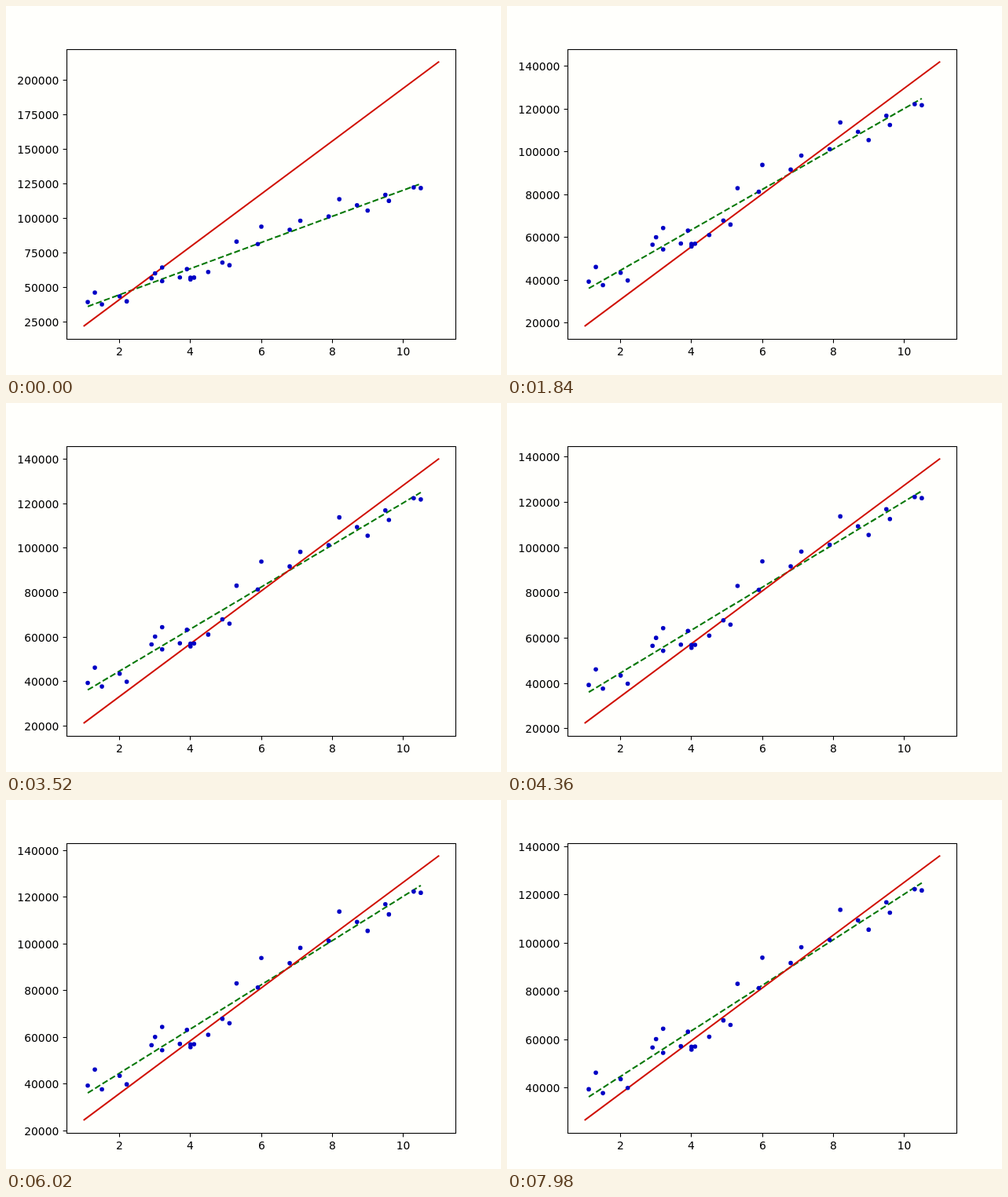
Recreate the animation shown at these times as an HTML page with a canvas. Size 630x470 px, loop 8 s.

```html
<!DOCTYPE html>
<html lang="en">
<head>
<meta charset="utf-8">
<title>Gradient descent line fit</title>
<style>
html, body { margin: 0; width: 630px; height: 470px; overflow: hidden; background: #fffffc; }
canvas { display: block; }
</style>
</head>
<body>
<canvas id="plot" width="630" height="470"></canvas>
<script>
const ctx = document.getElementById('plot').getContext('2d');
const LOOP = 8000, STEP = 80, PHASE = 60, RATE = 0.04;
const LEFT = 77, RIGHT = 573, TOP = 54.6, BOTTOM = 424.2;

const xs = [1.1, 1.3, 1.5, 2, 2.2, 2.9, 3, 3.2, 3.2, 3.7, 3.9, 4, 4, 4.1, 4.5,
  4.9, 5.1, 5.3, 5.9, 6, 6.8, 7.1, 7.9, 8.2, 8.7, 9, 9.5, 9.6, 10.3, 10.5];
const ys = [39343, 46205, 37731, 43525, 39891, 56642, 60150, 54445, 64445, 57189,
  63218, 55794, 56957, 57081, 61111, 67938, 66029, 83088, 81363, 93940,
  91738, 98273, 101302, 113812, 109431, 105582, 116969, 112635, 122391, 121872];

const mean = f => xs.reduce((sum, x, i) => sum + f(x, ys[i]), 0) / xs.length;
const mx = mean(x => x), my = mean((x, y) => y);
const mxx = mean(x => x * x), mxy = mean((x, y) => x * y);
const bestSlope = (mxy - mx * my) / (mxx - mx * mx);
const best = x => my + bestSlope * (x - mx);

// Line after n steps of gradient descent from zero
function fitted(n) {
  let a = 0, b = 0;
  while (n--) {
    const da = a + b * mx - my, db = a * mx + b * mxx - mxy;
    a -= RATE * da;
    b -= RATE * db;
  }
  return x => a + b * x;
}

const px = x => LEFT + (x - 0.5) / 11 * (RIGHT - LEFT);
const snap = v => Math.floor(v) + 0.5;

function stroke(x1, y1, x2, y2, color, width, cap = 'butt', dash = []) {
  ctx.strokeStyle = color;
  ctx.lineWidth = width;
  ctx.lineCap = cap;
  ctx.setLineDash(dash);
  ctx.beginPath();
  ctx.moveTo(x1, y1);
  ctx.lineTo(x2, y2);
  ctx.stroke();
}

function draw(n) {
  const line = fitted(n);
  const values = [...ys, best(1.1), best(10.5), line(1), line(11)];
  const min = Math.min(...values), max = Math.max(...values);
  const pad = (max - min) * 0.05, low = min - pad, high = max + pad;
  const py = y => BOTTOM - (y - low) / (high - low) * (BOTTOM - TOP);

  ctx.fillStyle = '#fffffc';
  ctx.fillRect(0, 0, 630, 470);

  stroke(px(1.1), py(best(1.1)), px(10.5), py(best(10.5)), '#087808', 2.08, 'butt', [7.71, 3.33]);
  stroke(px(1), py(line(1)), px(11), py(line(11)), '#d01000', 2.08, 'square');
  ctx.fillStyle = '#0000c4';
  xs.forEach((x, i) => {
    ctx.beginPath();
    ctx.arc(px(x), py(ys[i]), 2.8, 0, Math.PI * 2);
    ctx.fill();
  });

  ctx.fillStyle = '#000';
  ctx.font = '13.89px "DejaVu Sans", sans-serif';
  ctx.textAlign = 'center';
  for (let x = 2; x <= 10; x += 2) {
    const tx = snap(px(x));
    stroke(tx, 424.5, tx, 429.4, '#000', 1.1);
    ctx.fillText(x, tx, 445);
  }
  ctx.textAlign = 'right';
  const gap = [1e4, 2e4, 2.5e4, 5e4].find(g => g >= (high - low) / 9);
  for (let y = Math.ceil(low / gap) * gap; y <= high; y += gap) {
    const ty = snap(py(y));
    stroke(72.6, ty, 77.5, ty, '#000', 1.1);
    ctx.fillText(y, 67.3, ty + 5);
  }
  ctx.lineWidth = 1.1;
  ctx.strokeRect(77.5, 55.5, 495, 369);
}

function tick() {
  const t = performance.now() % LOOP;
  draw(1 + Math.floor((t + PHASE) / STEP));
  requestAnimationFrame(tick);
}
tick();
</script>
</body>
</html>
```
